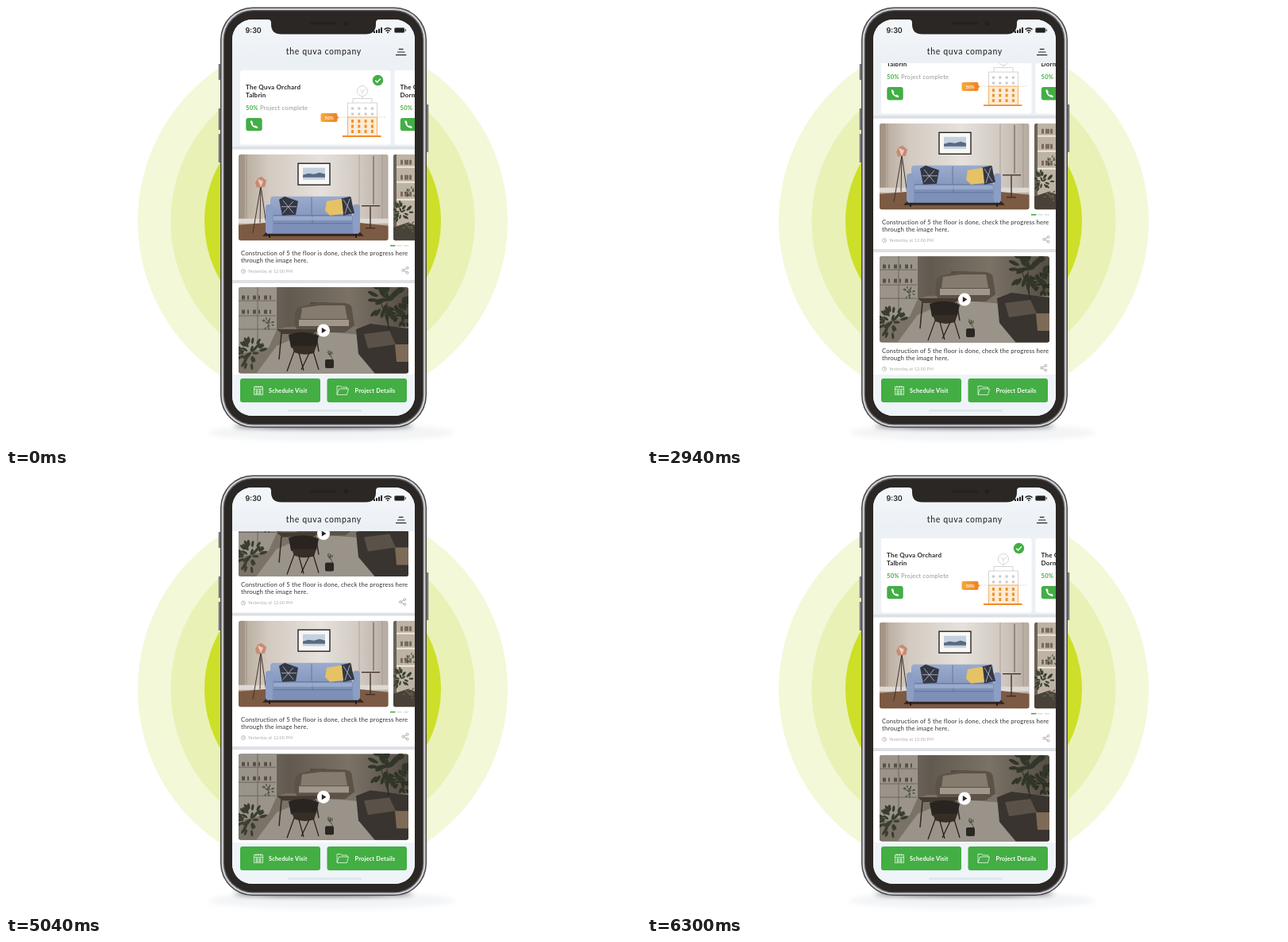
An HTML page that plays this animation: 800 by 554 pixels, repeating every 7230 ms.

```html
<!DOCTYPE html>
<html lang="en">
<head>
<meta charset="utf-8">
<title>Project app</title>
<style>
  html, body { margin: 0; width: 100%; height: 100%; overflow: hidden; background: #fff; }
  svg { display: block; width: 100vw; height: 100vh; }
  text { font-family: Lato, "Open Sans", sans-serif; }
  .brand { font-size: 10.5px; letter-spacing: .65px; fill: #2c2c2e; font-weight: 500; }
  .clock { font: 600 9px Inter, "Liberation Sans", sans-serif; fill: #222; }
  .name { font-size: 8px; font-weight: 700; letter-spacing: .22px; fill: #252525; }
  .status { font-size: 7.6px; letter-spacing: .25px; fill: #969696; }
  .status tspan { fill: #43ae46; font-weight: 700; }
  .badge { font-size: 5.6px; font-weight: 700; fill: #fff; }
  .body { font-size: 7.8px; letter-spacing: .115px; fill: #444; font-weight: 500; }
  .time { font-size: 5px; letter-spacing: .3px; fill: #a6a6a6; }
  .button { font-size: 7.3px; font-weight: 700; letter-spacing: .22px; fill: #fff; }
</style>
</head>
<body>
<svg viewBox="0 0 800 554">
  <defs>
    <clipPath id="screen"><rect x="285" y="17" width="230" height="499" rx="25"/></clipPath>
    <clipPath id="feedArea"><rect x="285" y="72" width="230" height="392"/></clipPath>
    <clipPath id="roomClip"><rect width="188.5" height="108.5" rx="3"/></clipPath>
    <clipPath id="peekClip"><rect width="40" height="108.5" rx="3"/></clipPath>
    <clipPath id="videoClip"><rect width="214" height="108.5" rx="3"/></clipPath>
    <filter id="blur" x="-20%" y="-400%" width="140%" height="900%"><feGaussianBlur stdDeviation="3"/></filter>
    <linearGradient id="header" x2="0" y2="1">
      <stop stop-color="#f4f7fa"/><stop offset="1" stop-color="#ebf0f5"/>
    </linearGradient>
    <linearGradient id="wall">
      <stop stop-color="#b3a596"/><stop offset=".2" stop-color="#d3cac1"/>
      <stop offset=".55" stop-color="#e6e1dc"/><stop offset=".82" stop-color="#d0c8c0"/>
      <stop offset="1" stop-color="#b5aaa0"/>
    </linearGradient>
    <linearGradient id="couch" x2="0" y2="1">
      <stop stop-color="#9aabcd"/><stop offset="1" stop-color="#7b8eb8"/>
    </linearGradient>
    <linearGradient id="dimWall">
      <stop stop-color="#807970"/><stop offset=".3" stop-color="#625a50"/>
      <stop offset=".65" stop-color="#7b7266"/><stop offset="1" stop-color="#544d44"/>
    </linearGradient>
    <linearGradient id="orange"><stop stop-color="#f7a93b"/><stop offset="1" stop-color="#ef7d22"/></linearGradient>

    <g id="share" fill="#fff" stroke="#999" stroke-width=".8">
      <path d="M2.2-2.8-2.5 0 2.2 2.8"/>
      <circle cx="2.6" cy="-3" r="1.4"/><circle cx="-2.8" r="1.4"/><circle cx="2.6" cy="3" r="1.4"/>
    </g>

    <g id="room" clip-path="url(#roomClip)">
      <rect width="189" height="109" fill="url(#wall)"/>
      <path d="M0 0H8V84H0Z" fill="#8f8274" opacity=".5"/>
      <path d="M10 0V84M152 0V84M181 0V84" stroke="#8d8177" opacity=".5"/>
      <path d="M0 81H189V87H0Z" fill="#dfd9d3"/>
      <path d="M0 89 36 86H150L189 90V109H0Z" fill="#7c5a43"/>
      <path d="M36 97H152L158 103H30Z" fill="#33261e"/>
      <path d="M170 2V63" stroke="#463d38" stroke-width=".8"/>
      <path d="M155 65H178M166 66V92M160 93H172" stroke="#37291f" stroke-width="1.3"/>
      <path d="M28 40 18 99M28 40 36 96M28 40 27 86" stroke="#40342d" stroke-width="1"/>
      <path d="M21 36 24 30 29 28 35 33 33 41 23 42Z" fill="#c58b78"/>
      <path d="M24 31 31 34 28 41Z" fill="#efc9b4"/>
      <rect x="75" y="11.5" width="40" height="27" fill="#f8f7f5" stroke="#262424" stroke-width="1.4"/>
      <rect x="81" y="17" width="28" height="15" fill="#c3d1df"/>
      <path d="M81 26 88 24 95 25 102 23 109 25V29H81Z" fill="#586980"/>
      <rect x="40" y="53" width="103" height="38" rx="4" fill="url(#couch)"/>
      <path d="M92 54V76" stroke="#64779f"/>
      <rect x="35" y="77" width="117" height="23" rx="3" fill="#7d90b8"/>
      <rect x="34" y="63" width="9" height="37" rx="4" fill="#8c9ec4"/>
      <rect x="144" y="63" width="9" height="37" rx="4" fill="#8c9ec4"/>
      <path d="M44 77H143M44 87H143M93 77V87" stroke="#5c6e96" stroke-width=".8"/>
      <path d="M44 78H143V83H44Z" fill="#aebcd9" opacity=".6"/>
      <path d="M39 100V105M148 100V105" stroke="#241b16" stroke-width="2"/>
      <path d="M51 57 58 53 75 59 72 76 55 77Z" fill="#343743"/>
      <path d="M56 58 69 74M69 59 56 74M54 66H73" stroke="#aeb4c2" stroke-width=".9"/>
      <path d="M128 56 141 53 146 74 132 77Z" fill="#343743"/>
      <path d="M132 57 142 73M140 56 134 75" stroke="#aeb4c2" stroke-width=".9"/>
      <path d="M111 59 130 56 132 75 115 77 109 71Z" fill="#e6c265"/>
    </g>
    <g id="peek" clip-path="url(#peekClip)"></g>
    <g id="video" clip-path="url(#videoClip)"></g>

    <g id="building" fill="none" stroke="#c9c9c9" stroke-width=".8">
      <circle cx="449" cy="107" r="6.5"/><path d="M446 105 449 108 453 104M449 108V111M449 113.5V116"/>
      <path d="M437 122V116.5H461V122M430.5 140V122H467.5V140"/>
      <path d="M419 140H479" stroke="#e6d1b8" stroke-dasharray="2 1"/>
      <path d="M430.5 140H467.5V164H430.5Z" fill="#fdecd6" stroke="#f2a145"/>
      <path d="M424 164H472.5" stroke="#f08a2c" stroke-width="1.8"/>
      <path d="M435 129H464M435 136H464" stroke-width="3" stroke-dasharray="3 5.3"/>
      <path d="M435 145H464M435 151.5H464M435 158H464" stroke="#ee9330" stroke-width="3.8" stroke-dasharray="3 5.3"/>
    </g>
    <g id="cardArt">
      <circle cx="468.5" cy="93.5" r="6.7" fill="#43ae46"/>
      <path d="M465.3 93.7 467.6 96 471.8 91.4" fill="none" stroke="#fff" stroke-width="1.5"/>
      <rect x="302.3" y="141" width="20.4" height="16.3" rx="3" fill="#43ae46"/>
      <path d="M309.3 145.6C309 149.5 312 152.6 315.8 152.8" fill="none" stroke="#fff" stroke-width="1.6"/>
      <path d="M309 145.5 310 147.5M314 151.8 316 152.8" stroke="#fff" stroke-width="2.4" stroke-linecap="round"/>
      <use href="#building"/>
      <path d="M398.5 135H415.5Q417.5 135 417.5 137V139L419.5 140.5 417.5 142V144Q417.5 146 415.5 146H398.5Q396.5 146 396.5 144V137Q396.5 135 398.5 135Z" fill="url(#orange)"/>
    </g>
  </defs>

  <rect width="800" height="554" fill="#fff"/>
  <circle cx="399" cy="271" r="233" fill="#f3f8d8"/>
  <circle cx="399" cy="271" r="191.5" fill="#e9f1b7"/>
  <circle cx="399" cy="271" r="149" fill="#cddf28"/>

  <g filter="url(#blur)">
    <ellipse cx="410" cy="537" rx="155" ry="11" fill="#d5dae2" opacity=".3"/>
    <ellipse cx="400" cy="529" rx="114" ry="3" fill="#111"/>
  </g>
  <path d="M269 73V93M269 129V156M269 161V197M531 124V184" stroke="#77757a" stroke-width="2.5"/>
  <rect x="270" y="1.5" width="260" height="529.5" rx="41" fill="#4a484a"/>
  <rect x="271.5" y="3" width="257" height="526.5" rx="39.5" fill="#d2d2d6"/>
  <rect x="273.7" y="5" width="252.6" height="522.5" rx="37.5" fill="#5f5d60"/>
  <rect x="275" y="6.3" width="250" height="520" rx="36.5" fill="#2a2724"/>

  <g clip-path="url(#screen)">
    <rect x="285" y="17" width="230" height="499" fill="#edf1f6"/>
    <g clip-path="url(#feedArea)"><g id="feed"></g></g>
    <rect x="285" y="17" width="230" height="55" fill="url(#header)"/>
    <text class="clock" x="301.5" y="34">9:30</text>
    <text class="brand" x="400.3" y="61" text-anchor="middle">the quva company</text>
    <path d="M494.8 54.3H500.5M493 58H502.5M491 61.7H504.3" stroke="#2b2b2b" stroke-width="1.2"/>
    <path d="M464 34V31.5M467 34V30.3M470 34V28.8M473 34V27" stroke="#222" stroke-width="2"/>
    <path d="M476.5 29.6Q481 25.8 485.5 29.6M478.5 31.7Q481 29.5 483.5 31.7" fill="none" stroke="#222" stroke-width="1.4"/>
    <circle cx="481" cy="33.2" r="1" fill="#222"/>
    <rect x="489.5" y="27.5" width="12.5" height="6" rx="1.5" fill="#222" stroke="#666" stroke-width=".7"/>
    <path d="M503.5 29.3V31.8" stroke="#444"/>

    <rect x="285" y="464" width="230" height="52" fill="#eff4f9"/>
    <rect x="295" y="469" width="101" height="30" rx="3" fill="#43ae43"/>
    <rect x="404.5" y="469" width="100.5" height="30" rx="3" fill="#43ae43"/>
    <g fill="none" stroke="#fff" stroke-width=".7">
      <path d="M312.5 479.5H323.5V489.5H312.5ZM312.5 482.5H323.5M315 478V481M318 478V481M321 478V481M314 485H322M314 487.5H322M316 483V489M320 483V489"/>
      <path d="M417 489V478.5H421.5L423 480H429.5V482M417 489.5 419.5 482H431.5L429.5 489.5Z"/>
    </g>
    <text class="button" x="331" y="486.7">Schedule Visit</text>
    <text class="button" x="439.5" y="486.7">Project Details</text>
    <rect x="355" y="508" width="93" height="3" rx="1.5" fill="#dce8ef"/>
  </g>
  <path d="M330 16H470V17Q466 17 466 21V23Q466 35.5 453 35.5H347Q334 35.5 334 23V21Q334 17 330 17Z" fill="#2a2724"/>
  <rect x="383" y="20.5" width="34" height="3" rx="1.5" fill="#24211f"/>
  <circle cx="428.5" cy="22" r="2.3" fill="#1b1a24"/><circle cx="428.5" cy="22" r=".8" fill="#3c4258"/>
</svg>
<script>
const LOOP = 7230, STEP = 30;
const CARD_PITCH = 194.5, SWIPE = 2 * CARD_PITCH, SCROLL = 374;
const byId = id => document.getElementById(id);

let seed = 7;
const random = () => (seed = seed * 16807 % 2147483647) / 2147483647;

// A loose cluster of leaves around a centre
function leaves(cx, cy, radius, count, color) {
  let out = "";
  for (let i = 0; i < count; i++) {
    const a = random() * 2 * Math.PI, d = radius * Math.sqrt(random());
    const x = (cx + d * Math.cos(a)).toFixed(1), y = (cy + d * Math.sin(a)).toFixed(1);
    out += `<ellipse cx="${x}" cy="${y}" rx="${radius * .22}" ry="${radius * .09}"
      transform="rotate(${Math.round(a * 57)} ${x} ${y})"/>`;
  }
  return `<g fill="${color}">${out}</g>`;
}

byId("peek").innerHTML = `
  <rect width="40" height="109" fill="#bdb3a5"/>
  <path d="M0 0H4V109H0Z" fill="#6b6257"/>
  <path d="M4 16H30M4 35H30M4 57H30" stroke="#eee7dc" stroke-width="2"/>
  <path d="M9 10H25M9 29H25M9 50H25" stroke="#7a6b5b" stroke-width="6" stroke-dasharray="3 2 5 1"/>
  <path d="M0 92 18 86 30 90V109H0Z" fill="#494238"/>
  ${leaves(10, 73, 13, 28, "#3a4030")}${leaves(21, 48, 7, 14, "#4a4e3c")}${leaves(19, 91, 8, 12, "#626650")}`;

byId("video").innerHTML = `
  <rect width="214" height="109" fill="url(#dimWall)"/>
  <path d="M0 68 60 50H214V109H0Z" fill="#7a7267"/>
  <path d="M48 74 92 55 156 60 174 109H22Z" fill="#99938a"/>
  <path d="M0 0H48V54L38 76 0 84Z" fill="#9a948b"/>
  <path d="M0 17H47M0 36H47M0 53H47M24 0V76" stroke="#6c665d"/>
  <path d="M4 13H44M4 31H44" stroke="#575047" stroke-width="5" stroke-dasharray="4 3 2 5"/>
  <rect x="90" y="19" width="21" height="14" fill="#50483f"/>
  <path d="M71 33Q72 25 80 24L100 19 134 20Q143 21 143 28L146 48 134 57H76L70 47Z" fill="#5b5348"/>
  <path d="M80 26 102 23H134L137 40H78Z" fill="#857b6f"/>
  <path d="M76 41H139V49H76Z" fill="#a0968a"/>
  <path d="M48 53H100L95 59H55Z" fill="#463b31"/>
  <path d="M54 58 51 91M97 58 101 81" stroke="#33291f" stroke-width="1.5"/>
  <path d="M63 60Q81 53 101 61L98 75Q82 82 66 76Z" fill="#292420"/>
  <path d="M67 74H98L95 83Q82 87 70 82Z" fill="#372e26"/>
  <path d="M70 81 61 106M94 81 101 104M76 83 82 105M89 83 79 104" stroke="#241b14" stroke-width="1.2"/>
  <path d="M148 53 166 46 214 52V109H172L151 84Z" fill="#39342f"/>
  <path d="M158 59 190 55 198 72 163 77Z" fill="#5a5248"/>
  <path d="M197 72H214V94H199Z" fill="#7d6b57"/>
  <path d="M180 21 190 53M187 19 189 53" stroke="#282e20"/>
  <rect x="109" y="91" width="11" height="11" rx="2" fill="#2b2722"/>
  ${leaves(187, 16, 25, 50, "#32362a")}${leaves(205, 36, 14, 22, "#2c3022")}
  ${leaves(15, 83, 18, 36, "#3a3e30")}${leaves(37, 46, 8, 16, "#4a4e3e")}${leaves(114, 86, 6, 12, "#40452f")}
  <circle cx="107" cy="54.5" r="8" fill="#fff"/>
  <path d="M104.8 51 110.5 54.5 104.8 58Z" fill="#2b2623"/>`;

const card = ([title, place], i) => `
  <g transform="translate(${i * CARD_PITCH})">
    <rect x="295" y="81" width="189.5" height="93.5" rx="3" fill="#fff"/>
    <use href="#cardArt"/>
    <text class="name" x="302" y="105">${title}</text>
    <text class="name" x="302" y="114.7">${place}</text>
    <text class="status" x="302" y="130.5"><tspan>50%</tspan> Project complete</text>
    <text class="badge" x="407" y="142.6" text-anchor="middle">50%</text>
  </g>`;

const caption = (y, shareX) => `
  <text class="body" x="296" y="${y}">Construction of 5 the floor is done, check the progress here</text>
  <text class="body" x="296" y="${y + 9}">through the image here.</text>
  <g fill="none" stroke="#a6a6a6" stroke-width=".7">
    <circle cx="299" cy="${y + 20}" r="2.5"/><path d="M299 ${y + 18.5}v1.7h1.3"/>
  </g>
  <text class="time" x="305" y="${y + 21.8}">Yesterday at 12:00 PM</text>
  <use href="#share" x="${shareX}" y="${y + 18.8}"/>`;

const panel = (y, height) => `
  <rect x="285" y="${y - 4}" width="230" height="4" fill="#dde0e5"/>
  <rect x="285" y="${y}" width="230" height="${height}" fill="#fff"/>`;

const photoPost = y => `${panel(y - 6, 164.5)}
  <use href="#room" x="293" y="${y}"/><use href="#peek" x="488" y="${y}"/>
  <path d="M484 ${y + 115}h6.5" stroke="#43ae46" stroke-width="1.6"/>
  <path d="M492.5 ${y + 115}h6M501 ${y + 115}h6" stroke="#d9dfda" stroke-width="1.5"/>
  ${caption(y + 127.3, 503)}`;

const videoPost = y => `${panel(y - 5, 159.5)}
  <use href="#video" x="293" y="${y}"/>
  ${caption(y + 121.8, 499.7)}`;

const projects = [
  ["The Quva Orchard", "Talbrin"],
  ["The Quva Kestrel", "Dormiva"],
  ["The Quva Silver", "Old Tarvek"]
];
byId("feed").innerHTML = `<g id="cards">${projects.map(card).join("")}</g>`
  + photoPost(186.7) + videoPost(354) + photoPost(518.2) + videoPost(685.7);

const ramp = (t, from, to) => Math.min(1, Math.max(0, (t - from) / (to - from)));
const smooth = p => p * p * (3 - 2 * p);

// Quick start with a long settling tail: cubic-bezier(.3, 0, 0, 1)
function settle(p) {
  let low = 0, high = 1;
  for (let i = 0; i < 24; i++) {
    const s = (low + high) / 2;
    if (.9 * s * (1 - s) ** 2 + s ** 3 < p) low = s; else high = s;
  }
  return smooth(high);
}

const feed = byId("feed"), cards = byId("cards");

function draw(t) {
  const x = SWIPE * (smooth(ramp(t, 0, 1500)) - smooth(ramp(t, 1590, 2550)));
  const y = SCROLL * (smooth(ramp(t, 2550, 4500)) - settle(ramp(t, 4860, 6300)));
  cards.setAttribute("transform", `translate(${-x.toFixed(2)})`);
  feed.setAttribute("transform", `translate(0 ${-y.toFixed(2)})`);
}

const start = performance.now();
function tick() {
  const t = (performance.now() - start) % LOOP;
  draw(Math.floor(t / STEP) * STEP);
  requestAnimationFrame(tick);
}
tick();
</script>
</body>
</html>
```
